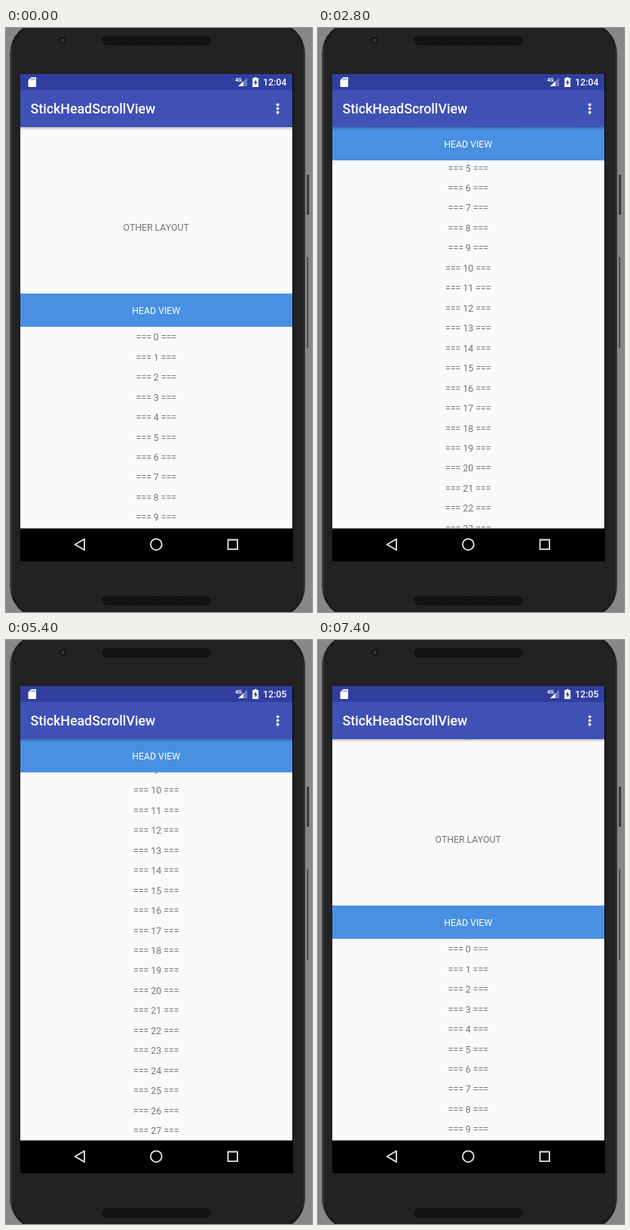
An HTML page for the animation above (8 s loop, 406 px wide and 772 px high).

```html
<!DOCTYPE html>
<html lang="en">
<head>
<meta charset="utf-8">
<title>Sticky head scroll view</title>
<style>
  html, body { margin: 0; width: 100%; height: 100%; overflow: hidden; background: #878787; }
  svg { display: block; width: 100%; height: 100%; }
  text { font: 12.3px Roboto, sans-serif; }
  .middle { text-anchor: middle; }
  .label { fill: #757575; }
  .white { fill: #fff; }
  .medium { font-weight: 500; }
</style>
</head>
<body>
<svg viewBox="0 0 406 772">
  <defs>
    <linearGradient id="shadow" x2="0" y2="1">
      <stop stop-color="#000" stop-opacity=".24"/>
      <stop offset="1" stop-color="#000" stop-opacity="0"/>
    </linearGradient>
    <linearGradient id="rim">
      <stop stop-color="#4a4a4b"/>
      <stop offset=".012" stop-color="#1b1b1c"/>
      <stop offset=".988" stop-color="#1b1b1c"/>
      <stop offset="1" stop-color="#3c3c3d"/>
    </linearGradient>
    <pattern id="mesh" width="4" height="4" patternUnits="userSpaceOnUse">
      <rect width="4" height="4" fill="#0c0c0c"/>
      <circle cx="1" cy="1" r=".8" fill="#2a2a2a"/>
      <circle cx="3" cy="3" r=".8" fill="#2a2a2a"/>
    </pattern>
    <clipPath id="content"><rect x="19" y="131" width="361" height="530.5"/></clipPath>
  </defs>

  <!-- phone body -->
  <rect width="406" height="772" fill="#878787"/>
  <path d="M399 194h3v53h-3zM399.5 303h1.500v120h-1.500z" fill="#3a3a3b"/>
  <rect x="5" y="-8" width="392" height="788" rx="42" fill="url(#rim)"/>
  <rect x="8" y="-5" width="386" height="782" rx="39" fill="#222223"/>
  <g fill="url(#mesh)" stroke="#101010">
    <rect x="128" y="11" width="144" height="11.5" rx="5.7"/>
    <rect x="128" y="751.5" width="144" height="11.5" rx="5.7"/>
  </g>
  <circle cx="75.5" cy="16.5" r="6" fill="#171717" stroke="#2b2b2b"/>
  <circle cx="75.5" cy="16.5" r="2.2" fill="#353538"/>

  <!-- scrolling content -->
  <rect x="19" y="61" width="362" height="644"/>
  <g clip-path="url(#content)">
    <rect x="19" y="131" width="361" height="531" fill="#fafafa"/>
    <g id="scroller" class="middle label">
      <text x="199.2" y="267.7">OTHER LAYOUT</text>
    </g>
    <g id="head">
      <rect x="19" width="361" height="44" fill="#4a90e2"/>
      <text class="middle white" x="199.2" y="27">HEAD VIEW</text>
    </g>
    <ellipse id="glow" cx="200" cy="131" fill="#3f51b5" opacity=".14"/>
  </g>

  <!-- status bar and toolbar -->
  <rect x="19" y="61" width="361" height="21" fill="#303f9f"/>
  <rect x="19" y="82" width="361" height="49" fill="#3f51b5"/>
  <rect x="19" y="131" width="361" height="4" fill="url(#shadow)"/>
  <g class="white">
    <path d="M33.5 65H39q1 0 1 1v11q0 1-1 1h-8.5q-1 0-1-1v-8z"/>
    <path d="M33.5 66.5v2m2-2v2m2-2v2" stroke="#303f9f" stroke-width=".9"/>
    <text x="304" y="70.5" style="font-size:7px;font-weight:700">4G</text>
    <path d="M320 65.5V77h-12z" opacity=".3"/>
    <path d="M315 70.3V77h-7z"/>
    <path d="M329.5 65h3v1.3h2.5V78h-8V66.3h2.5z"/>
    <path d="M331.7 67.8l-3 4.9h1.9v3.5l3-4.9h-1.9z" fill="#303f9f"/>
    <text id="clock" class="medium" x="341" y="76"></text>
    <text class="medium" x="32.5" y="113.2" style="font-size:17.8px">StickHeadScrollView</text>
    <circle cx="360.5" cy="101.3" r="1.9"/>
    <circle cx="360.5" cy="106.5" r="1.9"/>
    <circle cx="360.5" cy="111.7" r="1.9"/>
  </g>

  <!-- navigation bar icons -->
  <g fill="none" stroke="#e8e8e8" stroke-width="1.8" stroke-linejoin="round">
    <path d="M104 675.5v14.5l-12.5-7.25z"/>
    <circle cx="199.3" cy="682.7" r="7.4"/>
    <rect x="294.5" y="676.5" width="12.6" height="12.6"/>
  </g>
</svg>
<script>
const LOOP = 8000, STEP = 100;
const ROWS = 70, ROW_HEIGHT = 26.46, HEAD_TOP = 351, STICKY_TOP = 131;

// [time in ms, scroll offset in px]
const scrollKeys = [
  [1400, 0], [1500, 27], [2100, 205.5], [2900, 360],
  [3100, 360], [3700, 886], [4500, 1080],
  [4700, 1080], [5400, 474.5], [5600, 440],
  [6000, 440], [6600, 166], [7100, 0]
];

const byId = id => document.getElementById(id);
const scroller = byId('scroller'), head = byId('head');
const glow = byId('glow'), clock = byId('clock');

for (let i = 0; i < ROWS; i++) {
  const row = document.createElementNS(scroller.namespaceURI, 'text');
  row.setAttribute('x', 199.2);
  row.setAttribute('y', 413.2 + i * ROW_HEIGHT);
  row.textContent = `=== ${i} ===`;
  scroller.append(row);
}

const slope = i => {
  const a = scrollKeys[i], b = scrollKeys[i + 1];
  return a && b ? (b[1] - a[1]) / (b[0] - a[0]) : 0;
};

// Harmonic mean of neighbouring slopes keeps the curve from overshooting.
const tangent = i => {
  const before = slope(i - 1), after = slope(i);
  return before * after > 0 ? 2 * before * after / (before + after) : 0;
};

function scrollAt(time) {
  const next = scrollKeys.findIndex(key => key[0] > time);
  if (next <= 0) return 0;
  const [t0, y0] = scrollKeys[next - 1], [t1, y1] = scrollKeys[next];
  const span = t1 - t0, u = (time - t0) / span, v = 1 - u;
  return y0 * v * v * (1 + 2 * u) + y1 * u * u * (3 - 2 * u)
    + span * u * v * (tangent(next - 1) * v - tangent(next) * u);
}

function glowSize(time) {
  if (time < 7100) return [0, 0];
  if (time < 7300) return [15, 13];
  return time < 7400 ? [11, 7] : [7, 1.8];
}

function render(now) {
  const time = Math.floor(now % LOOP / STEP) * STEP;
  const offset = scrollAt(time);
  const [rx, ry] = glowSize(time);
  scroller.setAttribute('transform', `translate(0 ${-offset})`);
  head.setAttribute('transform', `translate(0 ${Math.max(STICKY_TOP, HEAD_TOP - offset)})`);
  glow.setAttribute('rx', rx);
  glow.setAttribute('ry', ry);
  clock.textContent = time < 5100 ? '12:04' : '12:05';
}

const start = performance.now();
function tick() {
  render(performance.now() - start);
  requestAnimationFrame(tick);
}
tick();
</script>
</body>
</html>
```
